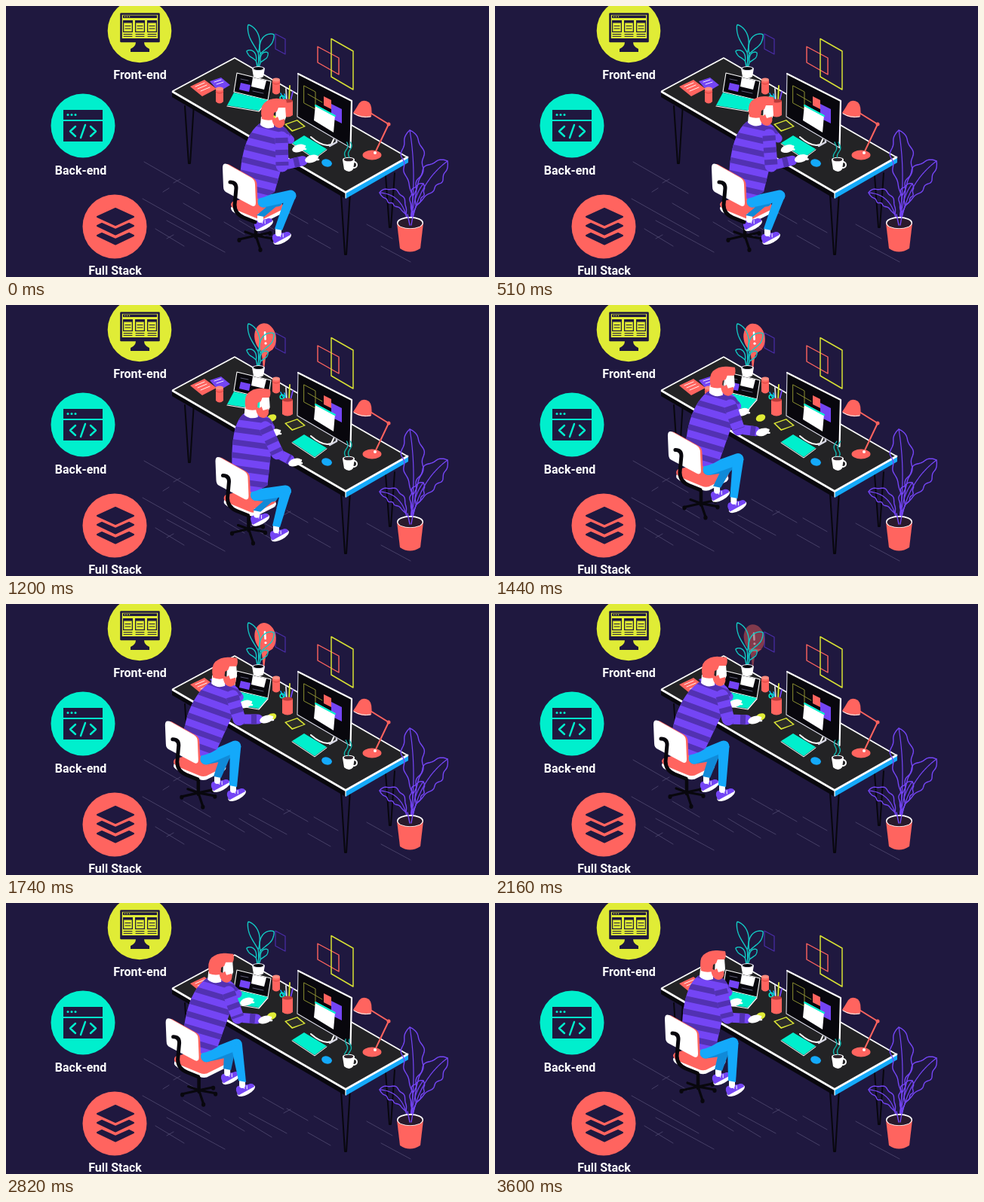
An HTML page with a canvas that plays this animation: 640 px wide and 360 px high, repeating every 3.63 s.

```html
<!DOCTYPE html>
<html lang="en">
<head>
<meta charset="utf-8">
<title>Web developer at work</title>
<style>
  html, body { margin: 0; width: 100%; height: 100%; overflow: hidden; background: #1f183f; }
  canvas { display: block; width: 640px; height: 360px; }
</style>
</head>
<body>
<canvas id="stage"></canvas>
<script>
const LOOP = 3630;
const NIGHT = '#1f183f', CORAL = '#ff645f', TEAL = '#00efcd', LIME = '#e0ec36', PURPLE = '#7445f5',
      DARK_PURPLE = '#5231b2', BLUE = '#14a9fa', FAR_BLUE = '#108ad8', WHITE = '#fff', BLACK = '#08070d',
      DESK = '#232325';

const canvas = document.getElementById('stage');
const ctx = canvas.getContext('2d');
const ratio = window.devicePixelRatio || 1;
canvas.width = 640 * ratio;
canvas.height = 360 * ratio;
ctx.scale(ratio, ratio);
ctx.lineJoin = 'round';

// ---- helpers ----
function fill(d, color) {
  ctx.fillStyle = color;
  ctx.fill(d instanceof Path2D ? d : new Path2D(d));
}
function line(d, color, width = 1, cap = 'round') {
  ctx.strokeStyle = color;
  ctx.lineWidth = width;
  ctx.lineCap = cap;
  ctx.stroke(d instanceof Path2D ? d : new Path2D(d));
}
function oval(x, y, rx, ry, color, angle = 0) {
  ctx.beginPath();
  ctx.ellipse(x, y, rx, ry, angle, 0, 7);
  ctx.fillStyle = color;
  ctx.fill();
}
function ring(x, y, r, color, width) {
  ctx.beginPath();
  ctx.arc(x, y, r, 0, 7);
  ctx.strokeStyle = color;
  ctx.lineWidth = width;
  ctx.stroke();
}
function box(x, y, w, h, color) {
  ctx.fillStyle = color;
  ctx.fillRect(x, y, w, h);
}
function at(x, y, draw) {
  ctx.save();
  ctx.translate(x, y);
  draw();
  ctx.restore();
}
const clamp = v => Math.min(1, Math.max(0, v));
const ease = u => u * u * (3 - 2 * u);
const mix = (a, b, u) => a + (b - a) * u;
const add = (p, x, y) => [p[0] + x, p[1] + y];
const between = (p, q, u) => [mix(p[0], q[0], u), mix(p[1], q[1], u)];

// Leaf outline along a quadratic midrib: bare up to `stem`, fullest near the tip.
function leaf([x0, y0, cx, cy, x1, y1, width, stem], color, wobble) {
  const left = [], right = [], rib = [];
  for (let i = 0; i <= 60; i++) {
    const u = i / 60, v = 1 - u;
    const x = v * v * x0 + 2 * u * v * cx + u * u * x1;
    const y = v * v * y0 + 2 * u * v * cy + u * u * y1;
    const dx = v * (cx - x0) + u * (x1 - cx), dy = v * (cy - y0) + u * (y1 - cy);
    const body = clamp((u - stem) / (1 - stem));
    const w = width * Math.pow(Math.sin(Math.PI * Math.pow(body, 1.3)), .7)
      * (1 + wobble * Math.sin(body * 22)) / Math.hypot(dx, dy);
    left.push([x - dy * w, y + dx * w]);
    right.unshift([x + dy * w, y - dx * w]);
    rib.push([x, y]);
  }
  line('M' + left.concat(right).join('L'), color, 1.4);
  if (wobble) line('M' + rib.join('L'), color, 1.2);
}

// ---- left column ----
function label(text, x, y) {
  ctx.font = '700 16px Roboto, sans-serif';
  ctx.textAlign = 'center';
  ctx.fillStyle = WHITE;
  ctx.fillText(text, x, y);
}
function drawIcons() {
  oval(177, 33, 42.3, 42.3, LIME);
  line('M152.5 10.5H202.5V47H152.5Z', NIGHT, 2.6);
  box(152, 43, 51, 5, NIGHT);
  box(155, 12.5, 45, 3.5, NIGHT);
  for (let i = 0; i < 3; i++) {
    const x = 155 + i * 16;
    box(x, 19, 13, 3, NIGHT);
    line(`M${x + .6} 22H${x + 12.4}V34.4H${x + .6}Z`, NIGHT, 1.2);
    line(`M${x + 3} 26.5H${x + 10}M${x + 3} 30H${x + 10}`, NIGHT, 1);
    line(`M${x + 1} 37.5H${x + 12}M${x + 1} 40.3H${x + 12}`, NIGHT, 1);
    oval(157.5 + i * 3, 14.2, .8, .8, LIME);
  }
  fill('M172 48H183Q183 54 190 57V61H165V57Q172 54 172 48Z', NIGHT);
  label('Front-end', 177.5, 97);

  oval(102, 159, 42.5, 42.5, TEAL);
  box(76, 138, 52, 13, NIGHT);
  box(76, 153, 52, 27, NIGHT);
  for (let i = 0; i < 3; i++) oval(82 + i * 5, 144.5, 1.5, 1.5, TEAL);
  line('M92 160L85 166.5L92 173M112 160L119 166.5L112 173M105 158L99 175', TEAL, 2.4);
  label('Back-end', 99, 224);

  oval(144, 293, 42.5, 42.5, CORAL);
  const layers = new Path2D(`M145 269L169 280L145 291L121 280Z
    M121 292L127 289L145 297L163 289L169 292L145 303.5Z
    M121 305L127 302L145 310L163 302L169 305L145 316.5Z`);
  fill(layers, NIGHT);
  line(layers, NIGHT, 2);
  label('Full Stack', 144.5, 357);
}

// ---- room ----
function drawRoom() {
  line(`M183 207L256 249M222 235L231 230M181 256L270 306M213 285L290 327M208 247L216 242M235 262L271 283
    M213 309L222 304M198 296L236 319M322 279L372 306M309 285L352 311M372 273L400 289M368 279L377 274
    M289 287L316 303M340 258L368 274M408 283L440 301M400 305L430 322M478 290L512 309M497 319L536 340`,
    '#4b456b', .9);
  line('M357 37L370 44V64L357 57Z', '#4a2da8', 1.2);
  line('M413 54L441 69V91L413 75Z', CORAL, 1.4);
  line('M431 43.5L460 60V111L431 94Z', '#d6df34', 1.5);
}

// Springs up from the laptop, then pulses gently until it fades.
function drawAlert(t) {
  if (t < 620 || t > 2290) return;
  const s = (t - 620) / 1000;
  const pulse = .03 * Math.sin((t - 1200) / 540 * Math.PI * 2) * clamp(s * 2);
  const scale = 1 - Math.exp(-7 * s) * Math.cos(15 * s) + pulse;
  ctx.save();
  ctx.globalAlpha = 1 - .95 * ease(clamp((t - 2010) / 270));
  ctx.translate(341, 94);
  ctx.scale(scale, scale);
  oval(2.5, -50, 14, 19, CORAL, -.18);
  fill('M-4 -36L13 -35Q4 -30 3 -24L0 0Q0 -22 -4 -36Z', CORAL);
  line('M2 -57L2.6 -48', WHITE, 2.6);
  oval(3, -42.5, 1.6, 1.6, WHITE);
  ctx.restore();
}

function drawCan(x, y) {
  fill(`M${x - 5} ${y}V${y + 17}Q${x} ${y + 22} ${x + 5} ${y + 17}V${y}Z`, CORAL);
  oval(x, y, 5, 2.5, '#ff8c80');
  line(`M${x - 5} ${y + 4}Q${x} ${y + 8} ${x + 5} ${y + 4}`, '#d9453f', 1);
}

function drawDesk() {
  for (const [x, y, h] of [[243, 133, 76], [450, 250, 80], [509, 225, 69]]) {
    line(`M${x - 6} ${y}L${x - 1} ${y + h}H${x + 1}L${x + 6} ${y - 3}`, BLACK, 2);
  }
  fill('M220 113L450 247V256L220 121Z', BLACK);
  fill('M450 247L533 200V208L450 256Z', BLUE);
  fill('M220 113L303 68L533 201L450 248Z', DESK);
  line('M221 113L303 69L532 201', WHITE, 1.7);
  line('M221 114L450 247.5L532 201', WHITE, 2.7);
  line('M450 248V255', WHITE, 1.2);
}

function drawDeskItems() {
  // papers
  fill('M270 100L285 95L297 105L282 114Z', PURPLE);
  line('M276 101L285 98M279 104L288 101', WHITE, .9);
  fill('M244 107L263 98L279 110L260 120Z', CORAL);
  line('M251 107L263 102M254 110L266 105M258 113L270 108', WHITE, .9);
  drawCan(283, 110);

  // potted plant
  for (const shape of [[334, 83, 338, 52, 321, 25, 6, .35], [334, 83, 335, 52, 355, 38, 7, .35],
                       [333, 83, 332, 64, 319, 60, 4, .3], [335, 83, 338, 68, 347, 62, 4, .3]]) {
    leaf(shape, '#12c9c4', 0);
  }
  fill('M326 83L328 94Q334 98 341 94L343 83Z', WHITE);
  oval(334.5, 83, 8.5, 3, '#d9d9e6');
  oval(334.5, 83, 6.5, 2, BLACK);

  // laptop
  fill('M306 89L351 100L347 125L302 114Z', BLACK);
  line('M306 89L351 100L347 125L302 114Z', WHITE, 1.1);
  fill('M311 102L324 105L322 114L309 111Z', PURPLE);
  fill('M327 95L345 99L342 111L325 107Z', WHITE);
  line('M311 97L321 99M327 113L341 116', '#5d5d77', 1);
  fill('M302 115L347 125L335 139L293 132Z', TEAL);
  line('M293 133L335 140L347 126', WHITE, 1.2);
  drawCan(358, 98);
  oval(352, 150, 6.5, 4.5, LIME, -.4);

  // pen cup
  line('M369 126L364 116M372 126L369 117', BLUE, 1.6);
  line('M375 126L376 106', LIME, 1.8);
  line('M377 126L380 114', PURPLE, 1.8);
  line('M372 126L371 110', '#d9d9e6', 1.8);
  ring(366, 122, 2.8, TEAL, 1.6);
  fill('M366 126V145Q373 150 380 145V126Z', CORAL);
  oval(373, 126, 7, 2.6, '#b93b3a');

  // phone
  fill('M369 157L386 151L397 160L379 167Z', LIME);
  fill('M371.5 157.5L385.5 152.5L394.5 160L379.5 165Z', '#2c2c2a');

  // monitor
  line('M437 171L431 184Q420 188 404 174', WHITE, 2);
  line('M438 174V181L429 186', '#d9d9e6', 2.5);
  fill('M387 89L458 125L456 189L386 147Z', BLACK);
  line('M387 90L458 126L456.5 188', WHITE, 2.2);
  line('M387 90L386 147L456 188', '#dcdce8', 1.1);
  line('M395 106L410 114V137L395 129ZM400 117L419 128', '#8c9032', 1);
  fill('M421 120L431 125V137L421 132Z', CORAL);
  fill('M431 130L445 137V156L431 149Z', PURPLE);
  fill('M410 131L436 145L434 168L408 152Z', WHITE);
  line('M410 132L436 146', TEAL, 2);

  // keyboard, mouse, mug
  fill('M379 182L395 172L425 190L409 202Z', TEAL);
  line('M379 183L409 203L425 191', WHITE, 1);
  oval(425, 208.5, 7, 5, BLUE, .3);
  ring(461, 211, 4, WHITE, 2);
  fill('M446 204L448 217Q455 223 460 217L462 204Z', WHITE);
  oval(454, 204, 8, 3.3, WHITE);
  oval(454, 204, 6.2, 2.3, '#30252b');

  // lamp
  line('M478 139L507 157L489 195', CORAL, 2);
  oval(507, 157, 2.5, 2.5, CORAL);
  oval(485, 198, 12.5, 6.5, CORAL);
  oval(489, 195, 2, 2, WHITE);
  fill('M460 142Q464 136 468 129Q473 123 481 128Q486 133 484 147Q470 151 460 142Z', CORAL);
  line('M461 143Q471 149 483 147', WHITE, 1);
}

function drawSteam(t) {
  for (const x of [450, 455]) {
    const points = [];
    for (let y = 181; y <= 201; y++) {
      points.push([x + 1.8 * Math.sin(y / 3.2 + t / LOOP * Math.PI * 12) + (201 - y) * .08, y]);
    }
    line('M' + points.join('L'), '#12b8b0', 1.4);
  }
}

function drawFloorPlant() {
  const shapes = [[535, 292, 545, 225, 535, 165, 14, .3], [537, 292, 546, 235, 585, 206, 14, .25],
                  [533, 292, 528, 250, 495, 248, 9, .2], [537, 292, 538, 255, 553, 236, 8, .25]];
  for (const shape of shapes) leaf(shape, PURPLE, .13);
  fill('M518 288L522 322Q535 331 549 322L553 288Z', CORAL);
  oval(535.5, 288, 17.5, 8, WHITE);
  oval(535.5, 288.5, 16, 6.8, '#2a1a2c');
  line('M535 291L532 277M537 291L540 274', PURPLE, 1.4);
}

// ---- person ----
// time | chair | head | elbow | near hand | far hand | knee | near foot | far foot
const POSES = [
  [0,    287, 210, 355, 144, 366, 212, 405, 203, 388, 189, 377, 252, 365, 307, 341, 289],
  [540,  287, 210, 353, 141, 366, 212, 405, 203, 388, 189, 377, 252, 365, 307, 341, 289],
  [1140, 281, 205, 336, 134, 362, 199, 385, 212, 357, 172, 374, 250, 365, 307, 339, 286],
  [1590, 211, 156, 290, 92, 309, 153, 344, 154, 318, 132, 304, 189, 305, 252, 284, 240],
  [2160, 210, 155, 291, 91, 309, 153, 344, 154, 318, 132, 303, 189, 305, 252, 284, 240],
  [2760, 211, 154, 285, 88, 307, 152, 344, 154, 318, 132, 305, 188, 317, 247, 297, 231],
  [3240, 225, 149, 289, 84, 308, 152, 344, 154, 318, 132, 315, 186, 318, 247, 300, 232]
];

function poseAt(t) {
  let i = POSES.length - 1;
  while (POSES[i][0] > t) i--;
  const from = POSES[i], to = POSES[i + 1] || from;
  const u = to === from ? 0 : ease((t - from[0]) / (to[0] - from[0]));
  const joints = [];
  for (let k = 1; k < from.length; k += 2) {
    joints.push([mix(from[k], to[k], u), mix(from[k + 1], to[k + 1], u)]);
  }
  return joints;
}

function drawChairSeat() {
  line('M44 72V97', BLACK, 4.5);
  line('M44 95L22 100M44 95L63 91M44 95L66 99M44 95L50 113M44 95L30 90', BLACK, 3.2);
  for (const [x, y] of [[22, 101], [63, 92], [66, 100], [50, 114]]) oval(x, y, 2.6, 3, BLACK);
  const seat = 'M13 50Q8 55 16 60L45 72Q52 75 58 71L78 61Q83 57 78 52L50 40Z';
  at(0, 5, () => fill(seat, WHITE));
  fill(seat, CORAL);
}
function drawChairBack() {
  const shell = 'M6 0Q0 -2 0 5L1 30Q1 36 6 38L38 55Q44 58 44 51L43 27Q43 21 38 18Z';
  at(2.5, .5, () => fill(shell, CORAL));
  fill(shell, WHITE);
  line('M10 24Q18 24 18 32L16 54Q16 66 28 71L43 77', BLACK, 5);
}

// The heel is lower left, the toe upper right.
function drawShoe([x, y]) {
  at(x, y, () => {
    ctx.rotate(-.5);
    oval(0, 2.5, 13, 5.5, WHITE);
    fill('M-12 3Q-13 -6 -8 -8L0 -7Q4 -3 9 -3Q14 -1 12 3Z', PURPLE);
    line('M1 -5L-1 -1M4 -3L2 1', WHITE, 1);
  });
}

function drawLeg(hip, knee, foot, color) {
  const ankle = add(foot, -4, -10);
  line(`M${ankle}L${add(ankle, 0, 5)}`, WHITE, 8);
  line(`M${hip}L${knee}`, color, 15);
  fill(`M${add(knee, -7, 2)}L${add(ankle, -5, -1)}L${add(ankle, 5, 1)}L${add(knee, 7.5, 0)}Z`, color);
}

function drawSleeve(from, to, width) {
  const d = `M${from}L${to}`;
  line(d, PURPLE, width);
  ctx.setLineDash([7, 9]);
  line(d, DARK_PURPLE, width, 'butt');
  ctx.setLineDash([]);
}

function drawHand(p, angle) {
  oval(p[0], p[1], 9, 5, WHITE, angle);
  line(`M${add(p, 3, 1)}L${add(p, 9, 1)}M${add(p, 3, -1)}L${add(p, 8, -3)}`, WHITE, 2.5);
}

function drawTorso(chair, head) {
  const back = add(chair, 24, 44), front = add(chair, 69, 37);
  const torso = new Path2D(
    `M${add(head, -12, 9)}C${add(head, -36, 16)} ${add(back, -4, -50)} ${back}
     Q${add(between(back, front, .5), 0, 11)} ${front}L${add(head, 21, 32)}
     Q${add(head, 20, 15)} ${add(head, 2, 13)}Z`);
  fill(torso, PURPLE);
  ctx.save();
  ctx.clip(torso);
  ctx.setLineDash([7.5, 9.5]);
  line(`M${add(between(back, front, .5), -4, 14)}L${add(head, 2, 10)}`, DARK_PURPLE, 150, 'butt');
  ctx.restore();
}

function drawHead() {
  fill('M-17 3L0 4V17Q-10 21 -18 14Z', WHITE);
  fill('M3 -11H15L16 4L13 11L2 9Z', WHITE);
  fill('M-16 6Q-19 -9 -13 -15Q-5 -22 6 -21L16 -20Q18 -13 15 -9L6 -9L4 -4L0 -2L-1 7Q-9 9 -16 6Z', CORAL);
  fill('M-3 3L2 5L5 3L7 8L14 6Q16 16 8 18Q-2 18 -3 3Z', CORAL);
}

function drawPerson(t) {
  const [chair, head, elbow, near, far, knee, nearFoot, farFoot] = poseAt(t);
  const typing = t < 600 ? 1 - ease(clamp((t - 480) / 120)) : ease(clamp((t - 1620) / 90));
  const tap = typing * Math.sin(t / 60 * Math.PI / 2);
  const nearHand = add(near, tap, -tap), farHand = add(far, -tap, tap);
  const hip = add(chair, 54, 50);

  at(...chair, drawChairSeat);
  drawShoe(farFoot);
  drawLeg(hip, add(between(knee, farFoot, .3), -7, -4), farFoot, FAR_BLUE);
  drawShoe(nearFoot);
  drawLeg(hip, knee, nearFoot, BLUE);

  const farShoulder = add(head, 14, 26);
  drawSleeve(farShoulder, between(farShoulder, farHand, .4), 11);
  drawHand(farHand, -.3);
  drawTorso(chair, head);
  drawSleeve(elbow, between(elbow, nearHand, .7), 13);
  drawSleeve(add(head, 10, 31), elbow, 17);
  drawHand(nearHand, -.3);
  at(...head, drawHead);
  at(...chair, drawChairBack);
}

function render(now) {
  const t = now % LOOP;
  box(0, 0, 640, 360, NIGHT);
  drawRoom();
  drawAlert(t);
  drawDesk();
  drawDeskItems();
  drawSteam(t);
  drawFloorPlant();
  drawPerson(t);
  drawIcons();
  requestAnimationFrame(() => render(performance.now() - start));
}
const start = performance.now();
render(0);
</script>
</body>
</html>
```
